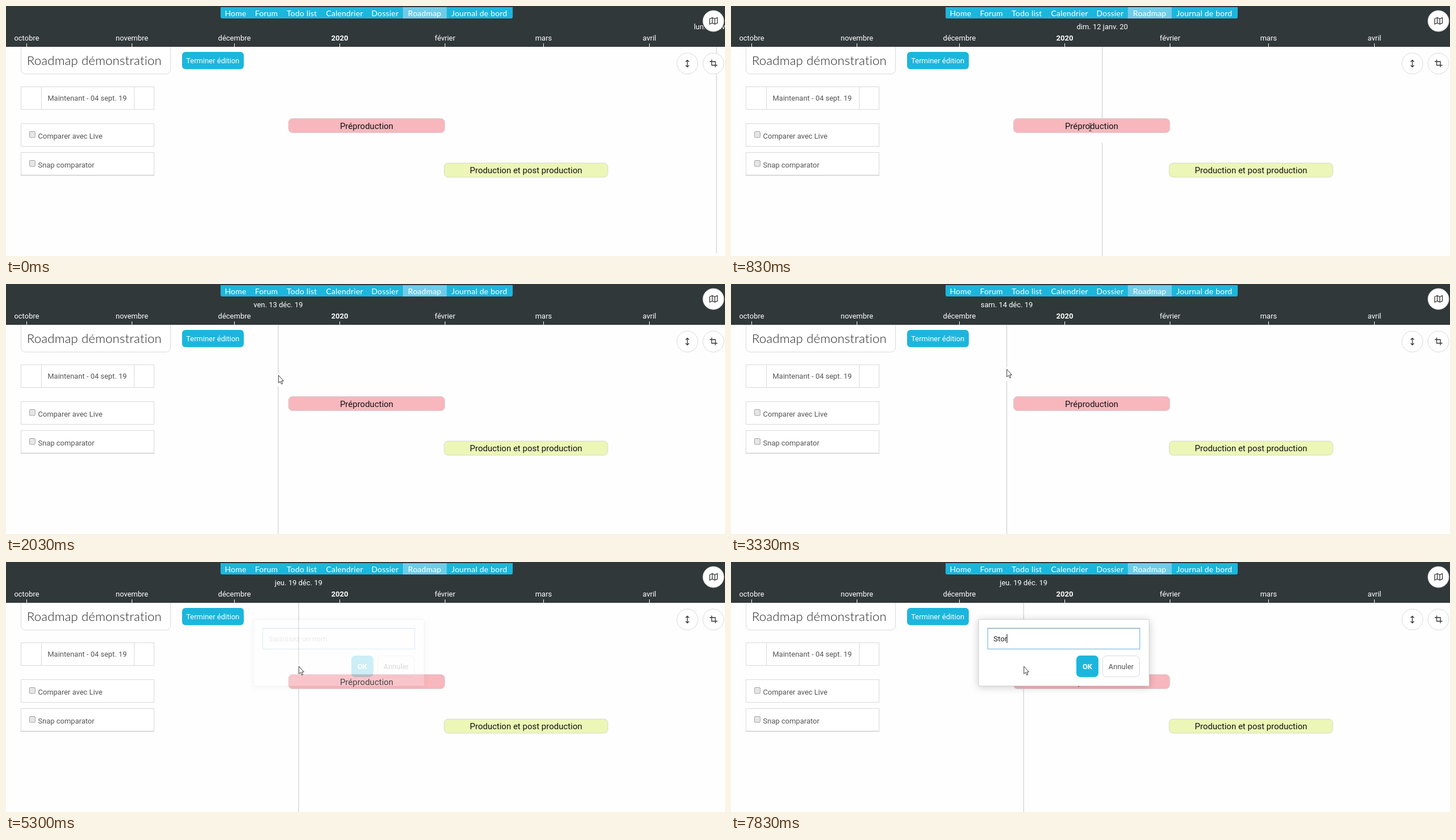
Recreate the animation shown at these times as an HTML page. Size 1270x441 px, loop 8000 ms.

```html
<!DOCTYPE html>
<html lang="fr">
<head>
<meta charset="utf-8">
<title>Roadmap</title>
<style>
  html, body { margin: 0; width: 100%; height: 100%; overflow: hidden; background: #fefefe; }
  svg { display: block; width: 1270px; height: 441px; font: 13px Roboto, sans-serif; }
  text { white-space: pre; }
  .mid { text-anchor: middle; }
  .white { fill: #fff; }
  .grey { fill: #555; }
  .blue { fill: #1cb6dc; }
  .nav { font: 14px Lato, sans-serif; letter-spacing: .2px; fill: #fff; text-anchor: middle; }
  .title { font: 300 22px Lato, sans-serif; letter-spacing: .3px; fill: #222; }
  .phase { font-size: 15px; fill: #111; text-anchor: middle; }
  .box { fill: #fff; stroke: #d9d9d9; }
  .check { fill: #e6e6e6; stroke: #a3a3a3; }
  .icon { fill: none; stroke: #333; stroke-width: 1.3; }
  .menu { font-size: 12px; fill: #1c2733; }
  .field { font-size: 13.333px; }
  #modalBox { fill: #fff; stroke: #d6d6d6; filter: drop-shadow(0 2px 7px rgba(0, 0, 0, .2)); }
</style>
</head>
<body>
<svg viewBox="0 0 1270 441">
  <rect width="1270" height="72" fill="#31383a"/>
  <path class="blue" d="M379 2H895V19a3 3 0 0 1-3 3H382a3 3 0 0 1-3-3Z"/>
  <rect x="701" y="2" width="77.500" height="20" fill="#6fcce8"/>
  <g id="nav"></g>
  <g id="months"></g>
  <text id="date" class="mid white" y="41"></text>

  <path id="guide" fill="none" stroke="#cfcfcf" stroke-width="1.200"/>

  <path class="box" d="M26.500 72V112a8 8 0 0 0 8 8H282.500a8 8 0 0 0 8-8V72"/>
  <text class="title" x="37" y="104">Roadmap démonstration</text>
  <rect class="blue" x="311" y="81" width="109" height="30.500" rx="6"/>
  <text class="mid white" x="365.200" y="100.500">Terminer édition</text>

  <path class="box" d="M26.500 142.500H261.500V182.500H26.500ZM62.500 142.500V182.500M226.500 142.500V182.500"/>
  <text class="grey" x="73.500" y="166.500">Maintenant - 04 sept. 19</text>
  <rect class="box" x="26.500" y="207.500" width="235" height="40"/>
  <rect class="check" x="41.500" y="221.500" width="10" height="10.500" rx="1.500"/>
  <text class="grey" x="56.500" y="234">Comparer avec Live</text>
  <rect class="box" x="26.500" y="258.500" width="235" height="40"/>
  <path d="M26 298.500H262" stroke="#bbb"/>
  <rect class="check" x="41.500" y="272.500" width="10" height="10.500" rx="1.500"/>
  <text class="grey" x="56.500" y="284.500">Snap comparator</text>

  <rect x="499" y="198.500" width="276" height="25" rx="7" fill="#f8b6bd" stroke="#d9cdce"/>
  <text class="phase" x="637" y="216.500">Préproduction</text>
  <rect x="774" y="277" width="289" height="25" rx="7" fill="#ecf6b6" stroke="#d8d8d0"/>
  <text class="phase" x="918.500" y="295">Production et post production</text>

  <circle class="box" cx="1249.500" cy="26.500" r="18.500"/>
  <path class="icon" d="M1243 22.500L1247.500 20.500L1252 22.500L1256.500 20.500V30L1252 32L1247.500 30L1243 32ZM1247.500 20.500V30M1252 22.500V32"/>
  <circle class="box" cx="1203.500" cy="101.500" r="18.500"/>
  <path class="icon" d="M1203.500 96V107M1200.500 98.500L1203.500 95.500L1206.500 98.500M1200.500 104.500L1203.500 107.500L1206.500 104.500"/>
  <circle class="box" cx="1249.500" cy="101.500" r="18.500"/>
  <path class="icon" stroke-width="1.600" d="M1246.500 94.500V104.500H1256.500M1243 98H1253V108"/>

  <g id="menu">
    <rect x="497.500" y="151.500" width="85" height="85" fill="#fff"/>
    <rect id="hover" x="498" width="84" height="28" fill="#eee"/>
    <path d="M497.500 151.500H582.500V236.500H497.500ZM497.500 179.500H582.500M497.500 207.500H582.500" fill="none" stroke="#444"/>
    <text class="menu" x="502.500" y="169">Créer phase</text>
    <text class="menu" x="502.500" y="197">Créer jalon</text>
    <text class="menu" x="502.500" y="225">Créer groupe</text>
  </g>

  <g id="modal">
    <rect id="modalBox" x="437.500" y="101.500" width="301" height="117"/>
    <rect x="453.500" y="117" width="268.500" height="36.500" fill="#fff" stroke="#8fc0e6" stroke-width="1.400"/>
    <path d="M453 117H722.500" stroke="#9aacba"/>
    <text id="field" class="field" x="463.500" y="139.500"></text>
    <path id="caret" d="M0 127V143" stroke="#111"/>
    <rect class="blue" x="610" y="165" width="39" height="38" rx="7"/>
    <text class="mid white" font-weight="700" x="629.500" y="188.500">OK</text>
    <rect class="box" x="656.500" y="165.500" width="65" height="37" rx="7"/>
    <text class="mid grey" x="689" y="188.500">Annuler</text>
  </g>

  <path id="arrow" d="M0 0V13.500L3 10.800L5.200 15.500L7.200 14.600L5.200 10H9Z" fill="#fff" stroke="#222" stroke-width=".9"/>
  <path id="beam" d="M-2.500 -6H2.500M0 -6V7M-2.500 7H2.500" fill="none" stroke="#444"/>
</svg>
<script>
const $ = id => document.getElementById(id);
const LOOP = 8000, LAG = 20, DAY = 6, ORIGIN = 37.2;

const nav = [['Home', 405.5], ['Forum', 460], ['Todo list', 522.5], ['Calendrier', 598],
  ['Dossier', 669.5], ['Roadmap', 739.5], ['Journal de bord', 836]];
$('nav').innerHTML = nav.map(([s, x]) => `<text class="nav" x="${x}" y="17.5">${s}</text>`).join('');

const months = [['octobre', 36.5], ['novembre', 222.5], ['décembre', 403.5], ['2020', 589.5],
  ['février', 775.5], ['mars', 949.5], ['avril', 1136.5]];
$('months').innerHTML = months.map(([s, x]) =>
  `<text class="mid white" x="${x}" y="61"${s === '2020' ? ' font-weight="700"' : ''}>${s}</text>` +
  `<path d="M${x} 66V72" stroke="#fff"/>`).join('');

// time, x, y of the pointer
const path = [
  [470, 1255, 440], [1200, 460.6, 150], [1340, 460.6, 150], [1640, 436, 152],
  [2010, 480.8, 161], [2280, 480.8, 161], [2360, 489.5, 155], [2590, 489.5, 155],
  [2660, 489.5, 152], [3200, 489.5, 152], [3360, 486, 150], [4685, 486, 150],
  [5020, 516.8, 184]
];
// time, typed text
const typing = [[6800, 'S'], [7300, 'St'], [7520, 'Sto'], [7830, 'Stor']];

function pointer(t) {
  const i = path.findIndex(k => k[0] > t);
  if (i < 0) return path[path.length - 1].slice(1);
  if (i === 0) return path[0].slice(1);
  const [t0, x0, y0] = path[i - 1], [t1, x1, y1] = path[i];
  let u = (t - t0) / (t1 - t0);
  if (i === 1) u = 1 - (1 - u) ** 2.23;
  return [x0 + (x1 - x0) * u, y0 + (y1 - y0) * u];
}

const weekdays = ['dim.', 'lun.', 'mar.', 'mer.', 'jeu.', 'ven.', 'sam.'];
const short = ['janv.', 'févr.', 'mars', 'avr.', 'mai', 'juin', 'juil.', 'août', 'sept.', 'oct.', 'nov.', 'déc.'];

function dateAt(x) {
  const d = new Date(Date.UTC(2019, 9, 1 + Math.floor((x - ORIGIN) / DAY)));
  const day = String(d.getUTCDate()).padStart(2, '0');
  return `${weekdays[d.getUTCDay()]} ${day} ${short[d.getUTCMonth()]} ${d.getUTCFullYear() % 100}`;
}

const show = (el, on) => el.setAttribute('visibility', on ? 'inherit' : 'hidden');
function setText(el, s) {
  if (el.textContent !== s) el.textContent = s;
}

function drawPointer(t) {
  const [x, y] = pointer(t), [gx, gy] = pointer(t - LAG);
  $('guide').setAttribute('d', `M${gx} 72V${gy - 4}M${gx} ${gy + 20}V441`);
  $('date').setAttribute('x', gx);
  setText($('date'), dateAt(gx));

  const overText = x > 590 && x < 684 && y > 202 && y < 221;
  for (const id of ['arrow', 'beam']) $(id).setAttribute('transform', `translate(${x + .5} ${y})`);
  show($('arrow'), t > 470 && !overText);
  show($('beam'), overText);

  show($('menu'), t >= 4110 && t < 5200);
  show($('hover'), x > 498);
  $('hover').setAttribute('y', y < 179.5 ? 151.5 : 179.5);
}

function drawModal(t) {
  const u = Math.min(1, Math.max(0, (t - 5200) / 470));
  show($('modal'), u > 0);
  $('modal').setAttribute('opacity', u);

  const key = typing.filter(k => k[0] <= t).pop();
  const field = $('field');
  setText(field, key ? key[1] : 'Saisissez un nom');
  field.setAttribute('fill', key ? '#222' : '#a6a6a6');
  const x = key ? Math.round(463.5 + field.getComputedTextLength()) - .5 : 464.5;
  $('caret').setAttribute('transform', `translate(${x} 0)`);
  show($('caret'), t >= 6330 || (t >= 5320 && t < 5820));
}

const start = performance.now();
function frame() {
  const t = (performance.now() - start) % LOOP;
  drawPointer(t);
  drawModal(t);
  requestAnimationFrame(frame);
}
frame();
</script>
</body>
</html>
```
